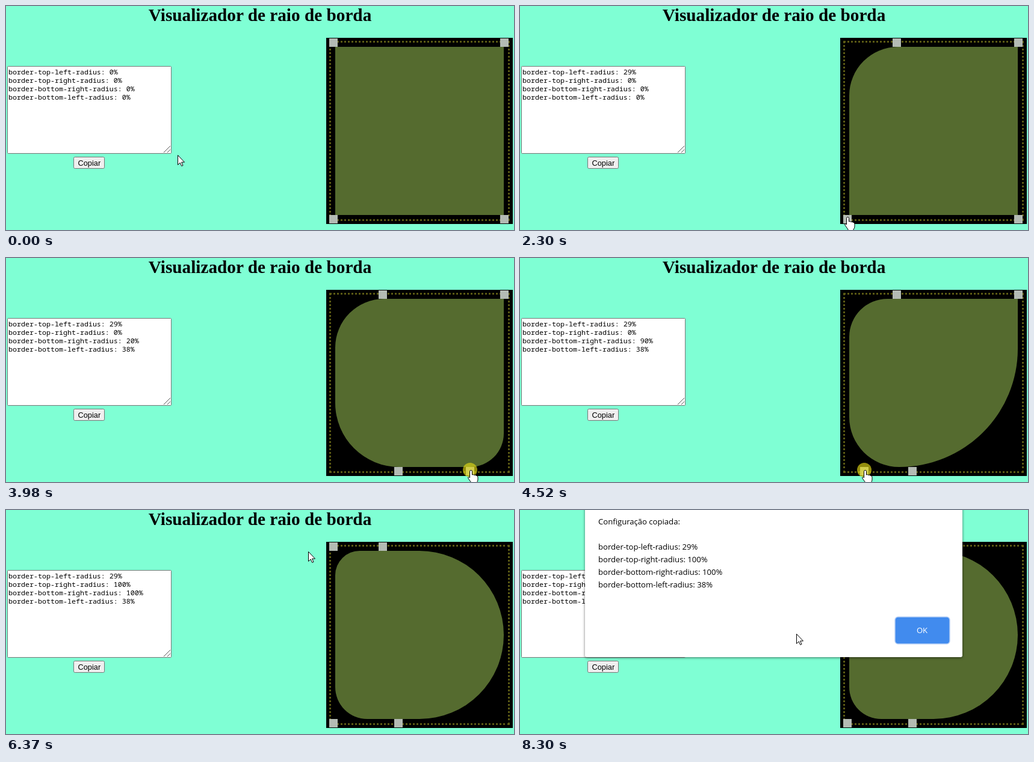
An HTML page for the animation above (8.38 s loop, 844 px wide and 373 px high).

```html
<!DOCTYPE html>
<html lang="pt">
<head>
<meta charset="utf-8">
<title>Visualizador de raio de borda</title>
<style>
  html, body { margin: 0; width: 100%; height: 100%; overflow: hidden; background: #7fffd4; }
  #frame, #dots, #shape, svg { position: absolute; box-sizing: border-box; }
  #frame { left: 532px; top: 53px; width: 310px; height: 310px; background: #000; }
  #dots { left: 537px; top: 58px; width: 300px; height: 300px; border: 3px dotted #5b5a14; }
  #shape { left: 547px; top: 68px; width: 280px; height: 280px; background: #556b2f; }
  svg { left: 0; top: 0; }
  .title { font: bold 29.25px "Liberation Serif", serif; text-anchor: middle; }
  .code { font: 500 11.67px "Noto Sans Mono", monospace; }
  .button { font: 12.8px "Liberation Sans", sans-serif; }
  .alert { font: 13.1px "Open Sans", sans-serif; }
  #alert > rect:first-child { filter: drop-shadow(0 1px 2px rgba(0, 0, 0, .55)); }
  .cursor { fill: #fff; stroke: #000; }
</style>
</head>
<body>
<div id="frame"></div>
<div id="dots"></div>
<div id="shape"></div>
<svg width="844" height="373" viewBox="0 0 844 373">
  <text class="title" x="422" y="25">Visualizador de raio de borda</text>
  <rect x="2.5" y="100.5" width="272" height="145" rx="1" fill="#fff" stroke="#767676"/>
  <path d="M262 244L273 233M268 244L273 239" stroke="#555"/>
  <g id="code" class="code"></g>
  <rect x="112.5" y="251.5" width="51" height="19" rx="2" fill="#efefef" stroke="#767676"/>
  <text class="button" x="119.5" y="266">Copiar</text>
  <g id="handles" fill="#b4bbb4"></g>
  <g id="alert">
    <rect x="108" y="-10" width="627" height="255" rx="3" fill="#fff"/>
    <text class="alert" x="130" y="24">Configuração copiada:</text>
    <g id="copied" class="alert"></g>
    <rect x="623" y="178" width="91" height="45" rx="5" fill="#418bee" stroke="#b5cff6" stroke-width="1.5"/>
    <text class="alert" x="668" y="205" fill="#fff" text-anchor="middle">OK</text>
  </g>
  <circle id="halo" r="12" fill="#e2d814" fill-opacity=".65"/>
  <g id="pointer">
    <path id="arrow" class="cursor" d="M.5.5V16.5L4.200 13L6.700 18.500L9 17.500L6.600 12.100H11.500Z"/>
    <path id="hand" class="cursor" transform="translate(1.5 .5)" d="M-2 2a2 2 0 0 1 4 0v5.500q2-1 3.500.5q2-.8 3.200.8q2.800-.3 2.800 2.700v4q0 3-2 5v2.300h-9v-2.300l-5-7q-1-2.500 1-2.500l1.500 1.500z"/>
    <path id="beam" d="M-3-8H3M0-8V8M-3 8H3" stroke="#000" fill="none"/>
  </g>
</svg>
<script>
const LOOP = 8380, TICK = 76.9, LEAD = 22;
const ALERT_TICK = 96;
const HANDLE = 14, TRAVEL = 284;

// Corners in CSS order: the handle is grabbed at `grab` and dragged to `percent`.
const corners = [
  { name: "top-left", grab: [545, 62], press: 16, release: 18.6, percent: 29 },
  { name: "top-right", grab: [821, 61], press: 75, release: 80, percent: 100 },
  { name: "bottom-right", grab: [828, 353], press: 49, release: 60, percent: 100 },
  { name: "bottom-left", grab: [543, 351], press: 38, release: 41.28, percent: 38 }
];
const [topLeft, topRight, bottomRight, bottomLeft] = corners;

// Pointer travel between drags; `bow` bends the way sideways.
const travels = [
  { from: 2, to: 13, end: topLeft.grab, bow: .5 },
  { from: 20, to: 29, end: bottomLeft.grab, bow: -.5 },
  { from: 42, to: 48, end: bottomRight.grab, bow: -2.35 },
  { from: 60, to: 65, end: [815, 79], bow: 0 },
  { from: 67, to: 73, end: topRight.grab, bow: 0 },
  { from: 81, to: 92, end: [151, 264], bow: .15 },
  { from: 105, to: 108, end: [459, 206], bow: 0 }
];

const el = id => document.getElementById(id);
function add(parent, tag, attributes) {
  const node = document.createElementNS("http://www.w3.org/2000/svg", tag);
  for (const key in attributes) node.setAttribute(key, attributes[key]);
  return el(parent).appendChild(node);
}
const show = (id, visible) => { el(id).style.display = visible ? "" : "none"; };
const clamp01 = u => Math.max(0, Math.min(1, u));
const easeInOut = u => (1 - Math.cos(Math.PI * u)) / 2;

corners.forEach((c, i) => {
  c.dir = c.name.endsWith("left") ? 1 : -1;
  c.home = c.dir > 0 ? 537 : 537 + TRAVEL;
  c.y = c.name.startsWith("top") ? 54 : 348;
  c.line = add("code", "text", { x: 4, y: 114 + 14 * i });
  c.copy = add("copied", "text", { x: 130, y: 66 + 21 * i });
  c.handle = add("handles", "rect", { y: c.y, width: HANDLE, height: HANDLE });
});

// The handle starts to follow one tick after the press.
function radiusAt(c, tick) {
  const begin = c.press + 1;
  return c.percent * clamp01((tick - begin) / (c.release - begin));
}

function draggedPoint(c, tick) {
  return [c.grab[0] + c.dir * radiusAt(c, tick) / 100 * TRAVEL, c.grab[1]];
}

function bowedPoint([x0, y0], [x1, y1], bow, u) {
  const side = 2 * u * (1 - u) * bow;
  const dx = x1 - x0, dy = y1 - y0;
  return [x0 + dx * u - dy * side, y0 + dy * u + dx * side];
}

function pointerAt(tick) {
  let point = [285, 248];
  for (const { from, to, end, bow } of travels) {
    if (tick < from) break;
    point = bowedPoint(point, end, bow, easeInOut(clamp01((tick - from) / (to - from))));
    const grabbed = corners.find(c => c.grab === end);
    if (grabbed && tick >= grabbed.press) point = draggedPoint(grabbed, tick);
  }
  return point;
}

function draw(time) {
  const tick = Math.floor((time + LEAD) / TICK);
  const [x, y] = pointerAt(tick);
  const alerting = tick >= ALERT_TICK;
  let overHandle = false, pressed = false;

  const radii = corners.map(c => {
    const radius = Math.floor(radiusAt(c, tick));
    const left = Math.round(c.home + c.dir * radius / 100 * TRAVEL);
    c.handle.setAttribute("x", left);
    c.line.textContent = c.copy.textContent = `border-${c.name}-radius: ${radius}%`;
    overHandle ||= x >= left && x <= left + HANDLE && y >= c.y && y <= c.y + HANDLE;
    pressed ||= tick >= c.press && tick < c.release;
    return radius + "%";
  });
  el("shape").style.borderRadius = radii.join(" ");

  const hand = pressed || overHandle;
  const beam = !alerting && x > 2 && x < 275 && y > 100 && y < 246;
  show("alert", alerting);
  show("halo", pressed);
  show("hand", hand);
  show("beam", beam);
  show("arrow", !hand && !beam);
  const place = `translate(${Math.round(x)} ${Math.round(y)})`;
  el("halo").setAttribute("transform", place);
  el("pointer").setAttribute("transform", place);
}

const start = performance.now();
function loop() {
  draw((performance.now() - start) % LOOP);
  requestAnimationFrame(loop);
}
loop();
</script>
</body>
</html>
```
